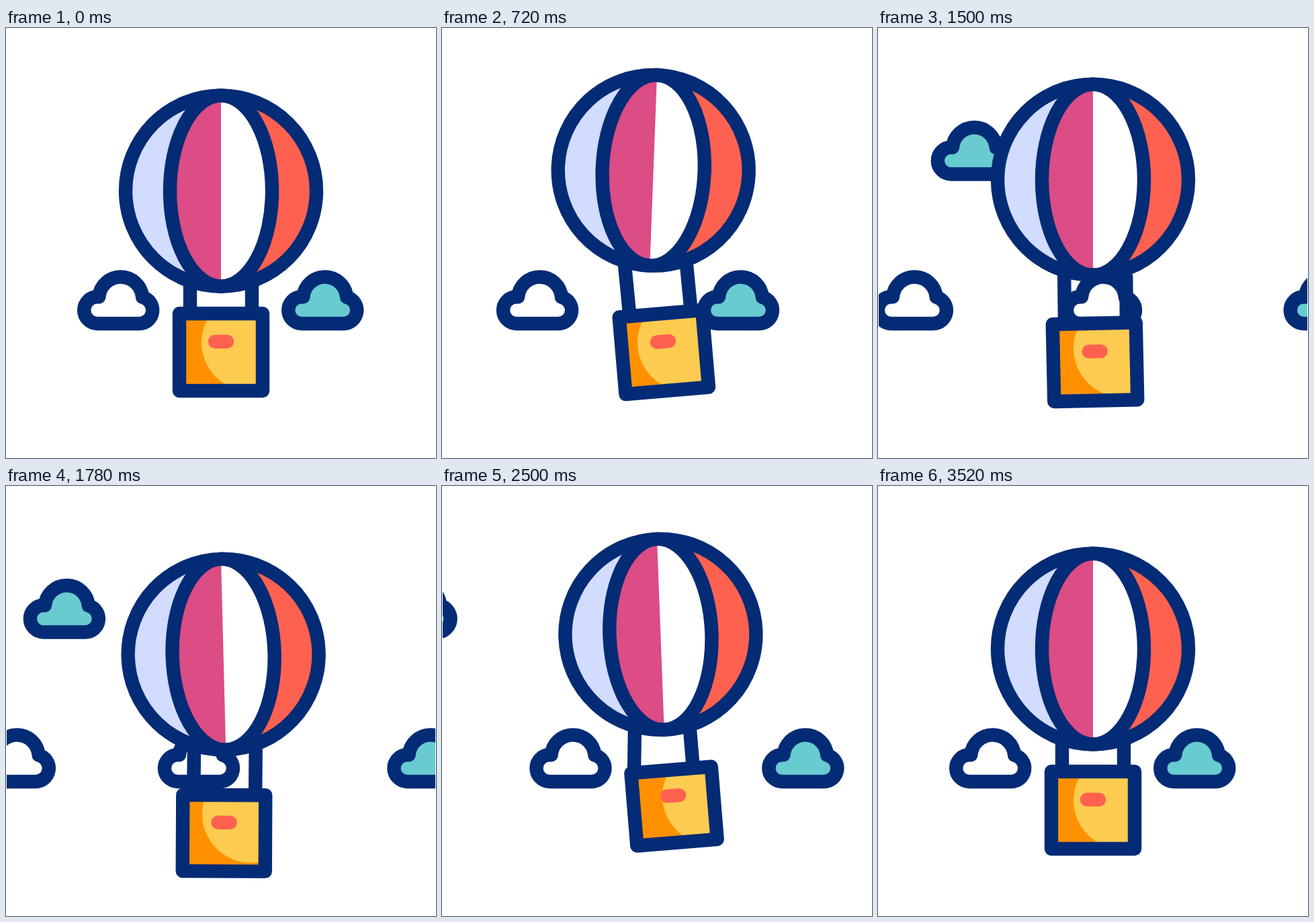
Recreate the animation shown at these times as an HTML page. Size 640 by 640 pixels, loop 3.54 s.

```html
<!DOCTYPE html>
<html lang="en">
<head>
<meta charset="utf-8">
<title>Balloon delivery</title>
<style>
  html, body { margin: 0; width: 100%; height: 100%; overflow: hidden; background: #fff; }
  svg { display: block; width: 100vw; height: 100vh; }
  .line { stroke: #042b75; stroke-width: 20.4; stroke-linejoin: round; }
</style>
</head>
<body>
<svg viewBox="0 0 640 640">
  <defs>
    <!-- drawn with its left outer edge at x = 0 -->
    <path id="cloud" class="line" d="M30.2 440A20 20 0 0 1 30.2 400L32.3 400.4A32.5 32.5 0 0 1 97.1 400.6A20 20 0 0 1 92.2 440Z"/>
    <clipPath id="inside"><rect id="mask"/></clipPath>
  </defs>

  <use id="high" href="#cloud" fill="#68cbd0"/>
  <use id="white" href="#cloud" fill="#fff"/>
  <use id="middle" href="#cloud"/>
  <use id="teal" href="#cloud" fill="#68cbd0"/>
  <path fill="#fff" d="M0 0H1V640H0ZM639 0H640V640H639Z"/>

  <path id="ropes" class="line" fill="none"/>

  <g id="balloon">
    <circle r="142" fill="#ff6150"/>
    <path d="M0 -142A142 142 0 0 0 0 142Z" fill="#d1dcff"/>
    <ellipse rx="76" ry="142" fill="#fff"/>
    <path d="M0 -142A76 142 0 0 0 0 142Z" fill="#dc4c85"/>
    <circle r="142" class="line" fill="none"/>
    <ellipse rx="76" ry="142" class="line" fill="none"/>
  </g>

  <g clip-path="url(#inside)">
    <rect width="640" height="640" fill="#ff9100"/>
    <circle id="glow" r="72.5" fill="#fdcb50"/>
  </g>
  <g id="box">
    <rect id="frame" class="line" fill="none"/>
    <rect x="-19.2" y="-26" width="38.4" height="20.4" rx="10.2" fill="#ff6150"/>
  </g>
</svg>
<script>
const LOOP = 3540;
const $ = id => document.getElementById(id);
const set = (id, attrs) => {
  for (const k in attrs) $(id).setAttribute(k, attrs[k]);
};

// Eased progress from 0 to 1 between two times.
const ease = (t, from, to) => {
  const u = Math.min(1, Math.max(0, (t - from) / (to - from)));
  return u * u * (3 - 2 * u);
};

// Starts at 0 and eases to each [time, value] in turn.
const path = (...keys) => t => {
  let value = 0, from = 0;
  for (const [to, goal] of keys) {
    value += (goal - value) * ease(t, from, to);
    from = to;
  }
  return value;
};

// Sinks to `low`, then floats up to `high` and settles.
const bob = (low, high) => path([1200, 0], [1900, low], [2720, high], [2900, high], [3520, 0]);

const lift = path([1110, -42.5], [1930, 13], [2710, -29], [3400, 0]);
const lean = path([720, 2.15], [1500, 0], [2060, -2.9], [3400, 0]);
const swing = path([720, 10.3], [1500, 3], [2060, 6], [2500, 25.5], [3020, 3.2], [3520, 0]);
const tilt = path([700, -4.9], [2060, 0.9], [2500, -4.7], [3050, 0]);
const squash = path([1500, 0], [2400, 1], [3100, 0]);
const sway = path([1700, 0], [2500, 1], [3520, 0]);
const ropeTop = path([720, -2], [2300, 8.5], [3520, 0]);
const ropeEnd = path([720, 5], [1500, 4], [2500, 10], [3520, 0]);
const boxBob = bob(37, -15);
const glowBob = bob(22, -13);

const clouds = {
  white: t => 106 - 261 * ease(t, 170, 3040),
  middle: t => 410 - 304 * ease(t, 170, 2990),
  teal: t => 701 - 291 * ease(t, 220, 3520),
  high: t => 229 - 391 * ease(t, 200, 3280)
};

function draw(t) {
  const by = 242.5 + lift(t);
  const cx = 320 + swing(t), cy = 482.5 + boxBob(t);
  const w = 124 - 4.5 * squash(t), h = 115 - 7 * squash(t);
  const place = `translate(${cx} ${cy}) rotate(${tilt(t)})`;
  const rect = { x: -w / 2, y: -h / 2, width: w, height: h };

  set('balloon', { transform: `translate(320 ${by}) rotate(${lean(t)} 0 -142)` });
  set('box', { transform: place });
  set('frame', rect);
  set('mask', { ...rect, transform: place });
  set('glow', { cx: 363.5 + 37 * sway(t), cy: 468 + glowBob(t) });

  const rope = side => {
    const top = 320 + ropeTop(t) + side * (46 - 5 * sway(t));
    const end = 320 + ropeEnd(t) + side * (46 - 2 * sway(t));
    return `M${top} ${by + 141}L${end} ${cy - h / 2}`;
  };
  set('ropes', { d: rope(-1) + rope(1) });

  for (const id in clouds) {
    set(id, { transform: `translate(${clouds[id](t)} ${id === 'high' ? -222.5 : 0})` });
  }
  const fade = ease(t, 800, 1400);
  const mix = [104, 203, 208].map(c => Math.round(c + (255 - c) * fade));
  set('middle', { fill: `rgb(${mix})` });
}

const start = performance.now();
function tick() {
  draw((performance.now() - start) % LOOP);
  requestAnimationFrame(tick);
}
draw(0);
requestAnimationFrame(tick);
</script>
</body>
</html>
```
